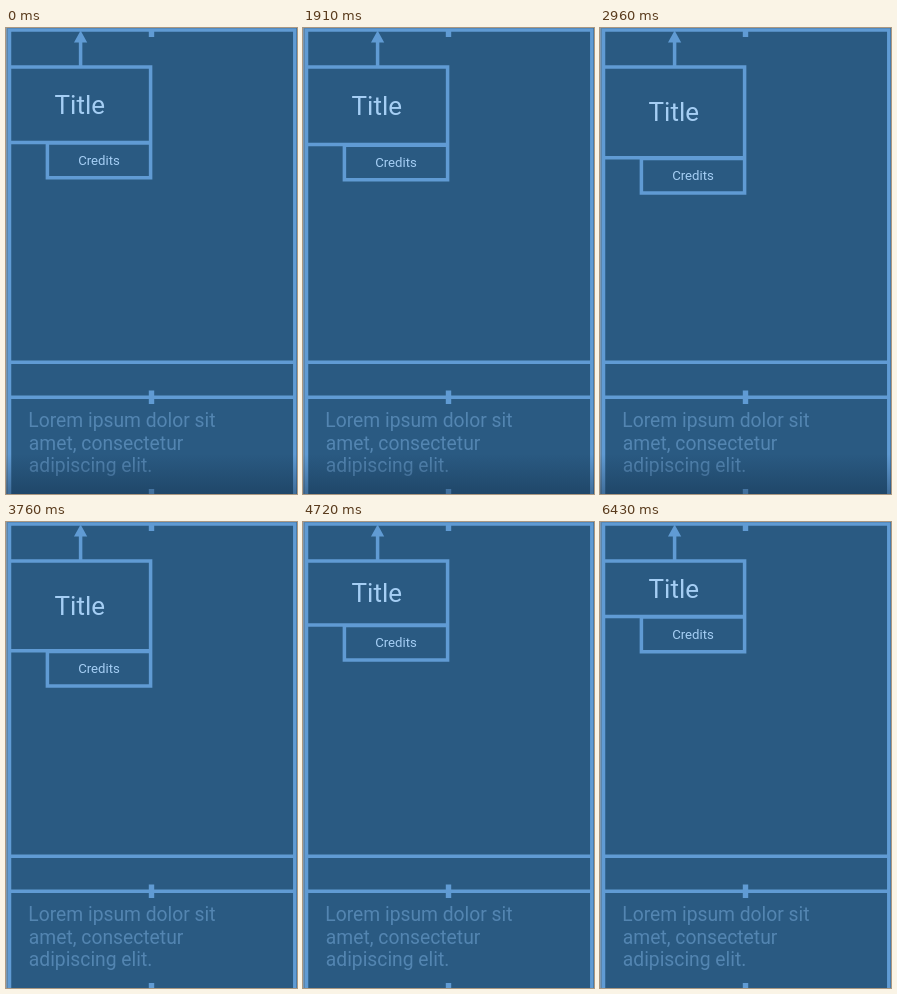
An HTML page that plays this animation: 291x466 px, repeating every 8 s.

```html
<!DOCTYPE html>
<html lang="en">
<head>
<meta charset="utf-8">
<title>Layout blueprint</title>
<style>
  html, body { margin: 0; width: 100%; height: 100%; overflow: hidden; background: #2a5a82; }
  svg { display: block; width: 100vw; height: 100vh; font-family: Roboto, sans-serif; }
  .line { fill: none; stroke: #609bd4; stroke-width: 3.5; }
  .head { fill: #609bd4; }
  .label { fill: #a5cef4; text-anchor: middle; }
  .body { fill: #5385b1; font-size: 19.3px; }
</style>
</head>
<body>
<svg viewBox="0 0 291 466">
  <defs>
    <linearGradient id="fade" x2="0" y2="1">
      <stop stop-color="#102a44" stop-opacity="0"/>
      <stop offset="1" stop-color="#102a44" stop-opacity=".4"/>
    </linearGradient>
  </defs>
  <rect width="291" height="466" fill="#2a5a82"/>
  <rect width="1.6" height="466" fill="#7c98b2"/>
  <g class="body">
    <text x="22.3" y="399">Lorem ipsum dolor sit</text>
    <text x="22.8" y="421.7">amet, consectetur</text>
    <text x="22.8" y="444.4">adipiscing elit.</text>
  </g>
  <path class="line" d="M3.5 466V2H288.8V466M3.5 334.3H288.8M3.5 369.3H288.8M74.6 39V12"/>
  <path class="head" d="M74.6 2.5L81.2 14.5H68ZM142.8 2h5.4v7h-5.4ZM142.8 362.5h5.4v13.5h-5.4ZM142.8 461h5.4v5h-5.4Z"/>
  <path class="line" id="boxes"/>
  <text class="label" id="title" x="73.8" font-size="26">Title</text>
  <text class="label" id="credits" x="93" font-size="13.2">Credits</text>
  <rect id="shade" y="426" width="291" height="40" fill="url(#fade)"/>
  <g id="cursor">
    <g id="ring" fill="none">
      <circle cx="13.5" cy=".5" r="5.7" stroke="#1687e0" stroke-width="3.6"/>
      <path d="M8 -1A5.7 5.7 0 0 1 13 -5.2" stroke="#7cc8f8" stroke-width="2.4"/>
    </g>
    <path d="M.5 .7V16L4 12.8L6.5 18.3L9 17.2L6.6 11.9H11.6Z" fill="#fff" stroke="#111" stroke-width=".9"/>
  </g>
</svg>
<script>
const LOOP = 8000, TICK = 135.8, FIRST = 500;
const $ = id => document.getElementById(id);
const show = (el, on) => el.setAttribute("visibility", on ? "visible" : "hidden");
const ramp = (k, from, to) => Math.min(1, Math.max(0, (k - from) / (to - from)));
const easeOut = u => u * (2 - u);
const easeInOut = u => u * u * (3 - 2 * u);

// The title box grows, rests, then shrinks past its first height.
const divider = k =>
  114.5 + 15.3 * easeOut(ramp(k, 9.7, 14)) - 35.3 * easeInOut(ramp(k, 22.8, 34.8));

// The cursor first wobbles near the text, later swings in from the right, busy.
function pointer(k, busy) {
  const d = k - (busy ? 14 : 1);
  return busy
    ? [258 + 2.9 * d * d, 297 - 7 * Math.cos(1.3 * d)]
    : [225 + 8 * Math.cos(2.1 * d), 395 + 23 * Math.cos(1.26 * d)];
}

function draw(now) {
  // The picture advances in whole ticks.
  const k = Math.floor((now % LOOP - FIRST) / TICK);
  const y = divider(k);
  $("boxes").setAttribute("d", `M3.5 39H144.6V${y}H3.5M41.4 ${y + .6}H144.6V${y + 35.2}H41.4Z`);
  $("title").setAttribute("y", (39 + y) / 2 + 9);
  $("credits").setAttribute("y", y + 22.4);
  $("shade").setAttribute("opacity", 1 - ramp(k, 22, 24));

  const busy = k >= 13 && k < 18;
  show($("cursor"), busy || k >= 0 && k < 5);
  show($("ring"), busy);
  $("cursor").setAttribute("transform", `translate(${pointer(k, busy)})`);
}

const start = performance.now();
function loop() {
  draw(performance.now() - start);
  requestAnimationFrame(loop);
}
loop();
</script>
</body>
</html>
```
